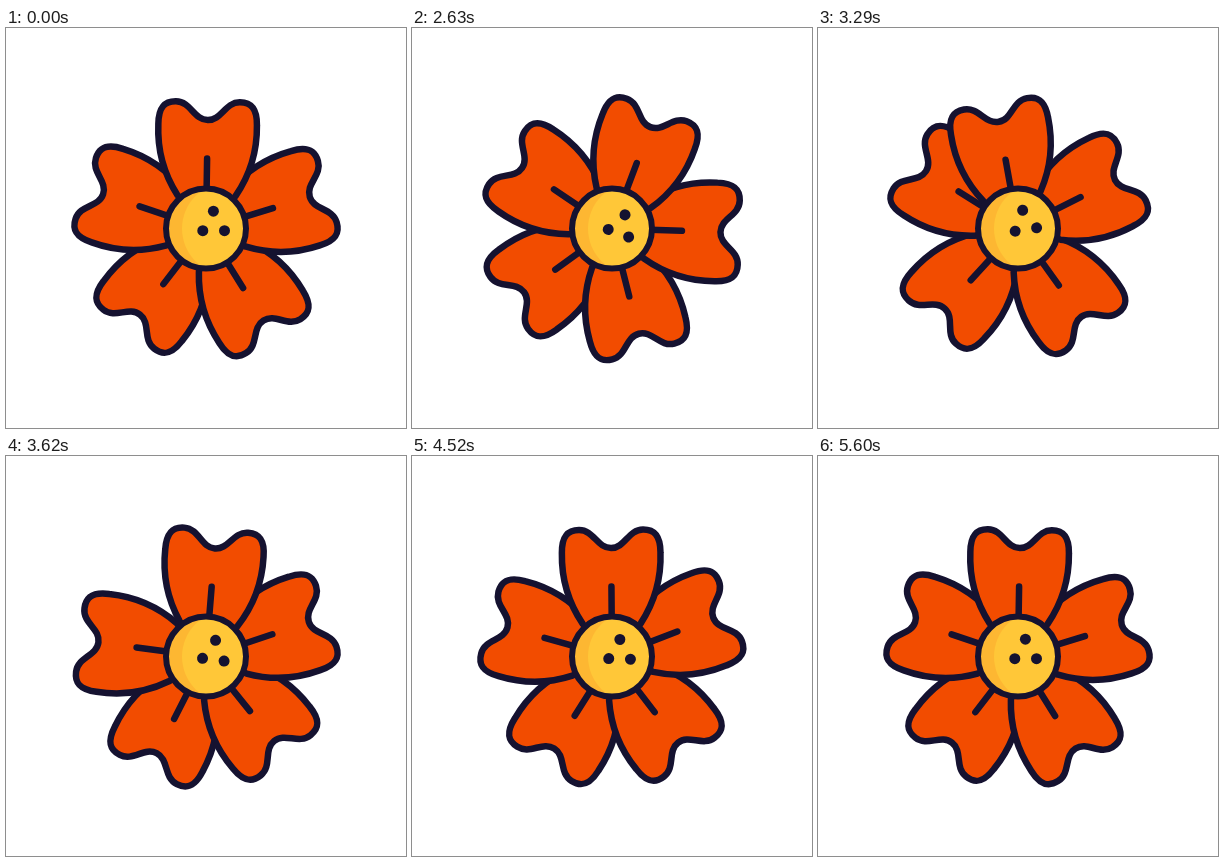
These frames come from a looping animation (400 by 400 pixels, 5630 ms). An HTML page:

```html
<!DOCTYPE html>
<html lang="en">
<head>
<meta charset="utf-8">
<title>Swaying flower</title>
<style>
  html, body { margin: 0; height: 100%; overflow: hidden; background: #fff; }
  svg { display: block; width: 100vw; height: 100vh; }
</style>
</head>
<body>
<svg viewBox="0 0 400 400">
  <defs>
    <g id="petal">
      <path fill="#f24c00" d="M0 0 L-29 -33 C-43 -54 -50 -78 -49.3 -104 C-49.3 -121.5 -43 -126.8 -32 -126.8
        C-17 -126.8 -14 -108.5 0 -108.5 C14 -108.5 17 -126.8 32 -126.8 C43 -126.8 49.3 -121.5 49.3 -104 C50 -78 43 -54 29 -33 Z"/>
      <path d="M0 -30 V-70"/>
    </g>
    <clipPath id="disc"><circle r="40"/></clipPath>
  </defs>
  <g transform="translate(200 200.6)" stroke="#151230" stroke-width="6.5" stroke-linecap="round" stroke-linejoin="round">
    <g id="petals"></g>
    <g stroke="none">
      <circle r="40" fill="#fdb732"/>
      <circle cx="22" r="46" fill="#ffc738" clip-path="url(#disc)"/>
      <g id="dots" fill="#151230">
        <circle cx="7.4" cy="-17.4" r="5.5"/>
        <circle cx="-3.2" cy="2.1" r="5.5"/>
        <circle cx="18.5" cy="2.1" r="5.5"/>
      </g>
    </g>
    <circle r="40" fill="none" stroke-width="6"/>
  </g>
</svg>
<script>
const LOOP = 5630, START = 2030, STAGGER = 95;
const swings = [[0, 0], [625, 20.4], [1145, -11.2], [1660, 8.2], [2165, -5.7], [2660, 4], [3110, 0]];
const restAngles = [0.9, 73, 148, 217.5, 288.5];
const paintOrder = [3, 2, 4, 1, 0];

const ease = x => (1 - Math.cos(Math.PI * x)) / 2;

// All parts set off together; each later one trails in the swings that follow.
function sway(time, order) {
  if (time <= 0) return 0;
  const keys = swings.map(([at, angle], k) => [k ? at + order * STAGGER : 0, angle]);
  const next = keys.findIndex(([at]) => time < at);
  if (next < 0) return 0;
  const [t0, a0] = keys[next - 1], [t1, a1] = keys[next];
  const x = (time - t0) / (t1 - t0);
  return a0 + (a1 - a0) * ease(next === 1 ? x ** 0.65 : x);
}

const petals = [];
for (const i of paintOrder) {
  const use = document.createElementNS("http://www.w3.org/2000/svg", "use");
  use.setAttribute("href", "#petal");
  petals[i] = document.getElementById("petals").appendChild(use);
}
const dots = document.getElementById("dots");
const rotate = (el, angle) => el.setAttribute("transform", `rotate(${angle})`);

function draw() {
  const time = performance.now() % LOOP - START;
  rotate(dots, sway(time, 0));
  petals.forEach((petal, i) => rotate(petal, restAngles[i] + sway(time, i + 1)));
  requestAnimationFrame(draw);
}
draw();
</script>
</body>
</html>
```
